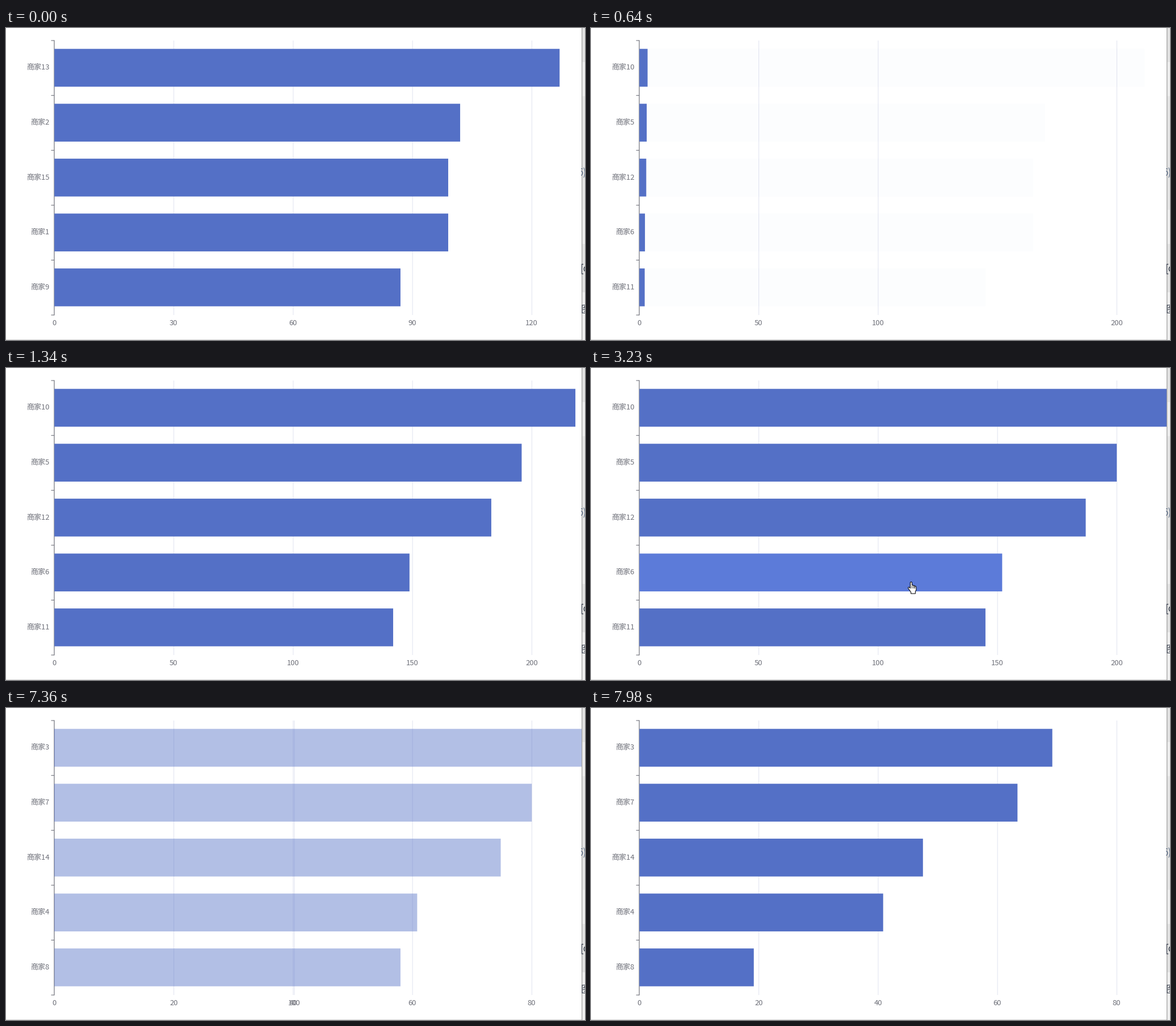
Animation, 1020 px wide and 549 px high, one loop 8 s. Source, as a matplotlib script:

```python
import numpy as np
import matplotlib.pyplot as plt
from matplotlib.animation import FuncAnimation
from matplotlib.patches import Polygon, Rectangle

W, H, DPI = 1020, 549, 64
LOOP, DT, HOLD = 8000, 20, 69.3
X0, TOP, GAP, BAND = 85, 22, 210.25, 96.6
BAR_TOP, BAR_H = 36.7, 66.6
EDGE = 1014
BLUE, LIT, INK, GRID = "#5470c6", "#5c7bd9", "#6e7079", "#e0e3f0"

# shop numbers, values, axis step
PANELS = [
    ([13, 2, 15, 1, 9], [127, 102, 99, 99, 87], 30),
    ([10, 5, 12, 6, 11], [223, 200, 187, 152, 145], 50),
    ([3, 7, 14, 4, 8], [83, 76, 57, 49, 23], 20),
]
# start of each switch, age of its first picture, age gained per picture
SWITCHES = [(500, 23, 66.9), (7360, 47, 67.4)]

HAND = [(4.5, 1.2), (5.5, .5), (6.6, .5), (7.4, 1.4), (7.4, 6), (9.2, 6),
        (10, 7), (11.5, 6.8), (12.4, 7.9), (13.8, 7.9), (14.9, 9.2),
        (14.9, 14.5), (13.4, 17.5), (13.4, 21), (5.6, 21), (5.6, 18.5),
        (3.2, 15), (.8, 11.6), (.8, 10.1), (2.3, 9.6), (4.5, 11.5)]
HAND = np.array(HAND) - (6, .5)
ARROW = np.array([(0, 0), (0, 16), (3.7, 12.6), (6.2, 18.2), (8.6, 17.2),
                  (6.2, 11.8), (11.2, 11.6)])

plt.rcParams["font.family"] = "Noto Sans CJK JP"
fig = plt.figure(figsize=(W / DPI, H / DPI), dpi=DPI, facecolor="white")
ax = fig.add_axes([0, 0, 1, 1])
ax.set_xlim(0, W)
ax.set_ylim(H, 0)
ax.axis("off")


def box(x, y, w, h, color, z):
    return ax.add_patch(Rectangle((x, y), w, h, fc=color, lw=0, zorder=z,
                                  snap=False))


def label(x, y, ha, s="", size=13, color=INK, z=2):
    return ax.text(x, y, s, ha=ha, va="baseline", color=color,
                   size=size * 72 / DPI, zorder=z)


def bar_row(z):
    return [box(X0 + .2, BAR_TOP + i * BAND, 0, BAR_H, BLUE, z)
            for i in range(5)]


def cubic_in_out(p):
    p = min(max(p, 0), 1)
    return 4 * p ** 3 if p < .5 else 1 - 4 * (1 - p) ** 3


# axis
box(X0 - .6, TOP - .5, 1.2, 5 * BAND + 1, INK, 2)
for i in range(6):
    box(79.5, TOP + i * BAND - .5, 5.5, 1.1, INK, 2)
lines = [box(0, TOP, 1, 5 * BAND, GRID, 1) for _ in range(6)]
ticks = [label(0, 522.6, "center") for _ in range(6)]
names = [label(76.7, 73.4 + i * BAND, "right") for i in range(5)]
bars, fading = bar_row(3), bar_row(4)

# window edge on the right and below
box(0, 548, EDGE, 1, "#d6d6d6", 5)
for y0, y1, shade in [(0, 60, "#e2e2e2"), (60, 120, "#eeeeee"),
                      (120, 320, "#e4e4e4"), (320, 380, "#eeeeee"),
                      (380, 465, "#e2e2e2"), (465, H, "#f0f0f0")]:
    box(EDGE, y0, W - EDGE, y1 - y0, shade, 5)
box(EDGE, 0, 1.3, H, "#a2a2a2", 6)
strip = Rectangle((EDGE - 1, 0), 7, H, transform=ax.transData)
for x, y, s, color in [(1007.5, 260, "5)", "#66758c"),
                       (1011, 429, "[c", "#3c4350"),
                       (1013, 501, "图", "#3c4350")]:
    label(x, y, "left", s, 17, color, 7).set(clip_path=strip, clip_on=True)

pointer = ax.add_patch(Polygon(ARROW, fc="white", ec="black", lw=1.15,
                               joinstyle="round", zorder=8))
knuckles = [ax.plot([], [], color="black", lw=1, zorder=9)[0]
            for _ in range(3)]


def pointer_at(t):
    if 1810 <= t < 3230:
        k = min((t - 1810) // 70, 5)
        p = 1 - (1 - k / 5) ** 2
        return 685 - 120 * p, 520 - 142.5 * p
    if 3230 <= t < 4440:
        k = max((t - 4160) // 70 + 1, 0)
        p = (k / 4) ** 1.5
        return 564 - 45 * p, 376.5 + 158.5 * p
    return None


def draw_pointer(t):
    """Place the pointer and light the bar below it."""
    tip = pointer_at(t)
    over = False
    for i, bar in enumerate(bars):
        y = BAR_TOP + i * BAND
        hit = (tip is not None and y <= tip[1] <= y + BAR_H
               and tip[0] <= X0 + bar.get_width())
        bar.set_facecolor(LIT if hit else BLUE)
        over = over or hit
    pointer.set_visible(tip is not None)
    if tip is not None:
        pointer.set_xy((HAND if over else ARROW) + tip)
    for dx, line in zip((1.4, 4, 6.4), knuckles):
        line.set_visible(over)
        if over:
            line.set_data([tip[0] + dx] * 2, [tip[1] + 6, tip[1] + 10])


def update(n):
    t = n * DT + DT // 2
    at, age = 0, 1e4
    for i, (start, first, gain) in enumerate(SWITCHES):
        if t >= start:
            at, age = i + 1, first + gain * ((t - start) // HOLD)
    shops, values, step = PANELS[at]
    old_values, old_step = PANELS[max(at - 1, 0)][1:]

    grow = cubic_in_out(age / 1000)
    slide = cubic_in_out(age / 500)
    fade = max(1 - age / 200, 0) ** 3

    for i in range(5):
        names[i].set_text(f"商家{shops[i]}")
        bars[i].set_width(values[i] * GAP / step * grow)
        fading[i].set_width(old_values[i] * GAP / old_step)
        fading[i].set_alpha(fade)
        fading[i].set_visible(fade > 0)

    # ticks found on both axes slide to their new place
    for i in range(6):
        value, x = i * step, i * GAP
        if value % old_step == 0 and value <= 5 * old_step:
            was = value * GAP / old_step
            x = was + (x - was) * slide
        x += X0
        lines[i].set_x(x - .1)
        lines[i].set_visible(i > 0)
        ticks[i].set_text(str(value))
        ticks[i].set_x(x)
        ticks[i].set_visible(x < W + 15)

    draw_pointer(t)


anim = FuncAnimation(fig, update, frames=LOOP // DT, interval=DT,
                     repeat=True, repeat_delay=0, cache_frame_data=False)
plt.show()
```
